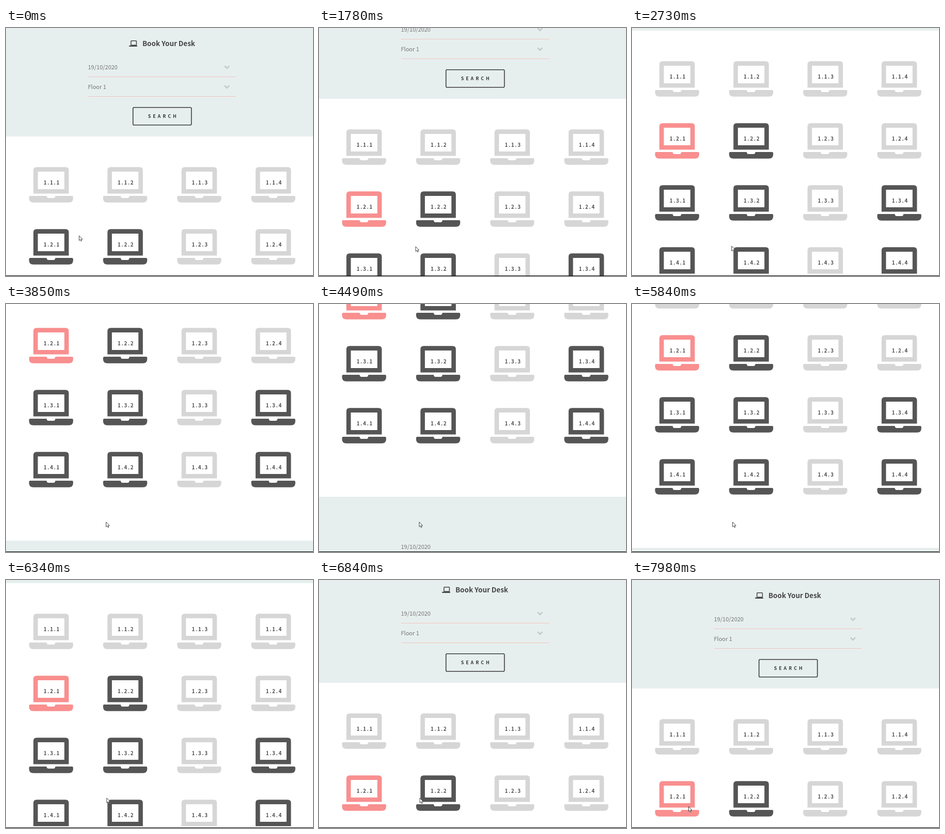
Animation of 594 by 480 pixels, one loop 8000 ms. Source, as an HTML page:

```html
<!DOCTYPE html>
<html lang="en">
<head>
<meta charset="utf-8">
<title>Desk booking</title>
<style>
  html, body { margin: 0; width: 100%; height: 100%; overflow: hidden; background: #fff; }
  svg { display: block; font-family: "Noto Sans CJK JP", "Noto Sans CJK SC", "Noto Sans CJK", "Open Sans", sans-serif; }
  .band { fill: #e7efee; }
  .title { font-size: 13.4px; font-weight: 700; fill: #444; }
  .field { font-size: 11px; font-weight: 300; fill: #757575; }
  .chevron { fill: none; stroke: #c8c8c8; stroke-width: 2.6; }
  .button rect { fill: none; stroke: #3c3c3c; stroke-width: 1.6; }
  .button text { font-size: 8.8px; font-weight: 900; letter-spacing: 4px; fill: #333; }
  .button.hover rect { stroke: #f98f8f; }
  .button.hover text { fill: #f98f8f; }
  .label { font-size: 9.8px; font-weight: 700; letter-spacing: 1.7px; fill: #4c4c4c; }
</style>
</head>
<body>
<svg id="stage" width="594" height="480" viewBox="0 0 594 480">
  <g id="page"></g>
  <rect y="479" width="594" height="1"/>
  <path id="cursor" d="M0 0V9.3L2.2 7.4 3.7 10.7 5.2 10 3.8 6.9H6.6Z" fill="#fff" stroke="#333" stroke-width=".9"/>
</svg>
<script>
const LOOP = 8000, FOOTER = 801;
const GREY = '#d6d6d6', DARK = [85, 85, 85], PINK = [249, 143, 143];
const LAPTOP = 'M8.5 51.3V6.4Q8.5 0 14.9 0H70.6Q77 0 77 6.4V51.3ZM17.1 8.6V42.8H68.4V8.6Z' +
  'M2 55.6H34q.5 4.2 4.5 4.2h8q4 0 4.5-4.2H83.5q2 0 2 4 0 8.8-8.5 8.8H8.5Q0 68.4 0 59.6 0 55.6 2 55.6Z';

// Each wheel notch eases the page by one step, within the scroll range.
const STEP = 68.2, NOTCH_MS = 190, MAX_SCROLL = 532;
const DOWN = [1555, 1750, 2185, 3205, 3435, 3832, 4425, 4490];
const UP = [5185, 5410, 5670, 5870, 6230, 6290, 6340, 6705];

// Pointer stops: [time, x, y]
const POINTER = [
  [10, 141.5, 402], [760, 94, 432], [1100, 115, 446], [1345, 115, 446], [1760, 187, 423],
  [2990, 193.5, 422], [7115, 195, 422], [7480, 300, 84.5], [7920, 110, 423.5], [7980, 109.5, 438.5]
];

const clamp = (v, lo = 0, hi = 1) => Math.max(lo, Math.min(hi, v));
const smooth = u => u * u * (3 - 2 * u);
const mix = (a, b, u) => a.map((v, i) => v + (b[i] - v) * u);

function scrollAt(t) {
  let target = 0, offset = 0;
  const turn = (start, step) => {
    const next = clamp(target + step, 0, MAX_SCROLL);
    offset += (next - target) * smooth(clamp((t - start) / NOTCH_MS));
    target = next;
  };
  DOWN.forEach(start => turn(start, STEP));
  UP.forEach(start => turn(start, -STEP));
  return Math.round(offset);
}

function pointerAt(t) {
  const next = POINTER.findIndex(k => k[0] > t);
  if (next < 1) return POINTER.at(next).slice(1);
  const a = POINTER[next - 1], b = POINTER[next];
  return mix(a, b, smooth((t - a[0]) / (b[0] - a[0]))).slice(1);
}

const field = (y, text, line) =>
  `<text class="field" x="158.5" y="${y}">${text}</text>
   <rect x="159" y="${y + 14}" width="286" height="1" fill="${line}"/>`;
const chevron = y => `<path class="chevron" d="M422.9 ${y}l4.6 4.6 4.6-4.6"/>`;
const button = (id, x, text) =>
  `<g class="button" id="${id}"><rect x="245.7" y="153.7" width="113" height="34" rx="2"/>
   <text x="${x}" y="174">${text}</text></g>`;

function desk(row, col) {
  const name = `1.${row + 1}.${col + 1}`;
  const dark = row > 0 && col < 2 || row > 1 && col === 3;
  return `<g transform="translate(${44.5 + col * 143.3} ${269.3 + row * 120})">
    <path id="desk${name}" d="${LAPTOP}" fill-rule="evenodd" fill="${dark ? `rgb(${DARK})` : GREY}"/>
    <text class="label" x="28.3" y="33.8">${name}</text></g>`;
}

const header = `<rect class="band" width="594" height="210"/>
  <rect x="241.8" y="24.7" width="10.6" height="8.5" rx="1" fill="none" stroke="#444" stroke-width="1.5"/>
  <rect x="238" y="33.8" width="16" height="2.2" rx="1" fill="#444"/>
  <text class="title" x="264" y="34.5">Book Your Desk</text>` +
  field(80, '19/10/2020', '#f0c5c1') + chevron(73.3) +
  field(118, 'Floor 1', '#f0c5c1') + chevron(111.3) +
  button('search', 274.7, 'SEARCH');
const footer = `<rect class="band" y="${FOOTER}" width="594" height="220"/>
  <g transform="translate(0 ${FOOTER + 21})">` +
  field(80, '19/10/2020', '#c9cfce') + field(118, 'desk121', '#c9cfce') +
  button('book', 283.5, 'BOOK') + '</g>';

let desks = '';
for (let row = 0; row < 4; row++)
  for (let col = 0; col < 4; col++) desks += desk(row, col);

const $ = id => document.getElementById(id);
$('page').innerHTML = header + desks + footer;
const page = $('page'), cursor = $('cursor'), search = $('search'), picked = $('desk1.2.1');

function draw(t) {
  const scroll = scrollAt(t);
  const [x, y] = pointerAt(t);
  page.setAttribute('transform', `translate(0 ${-scroll})`);
  cursor.setAttribute('transform', `translate(${x} ${y})`);
  const pageY = y + scroll;
  search.classList.toggle('hover', x > 245 && x < 359 && pageY > 153 && pageY < 188);
  const rgb = mix(DARK, PINK, clamp((t - 560) / 200));
  picked.setAttribute('fill', `rgb(${rgb.map(Math.round)})`);
}

const start = performance.now();
function tick() {
  draw((performance.now() - start) % LOOP);
  requestAnimationFrame(tick);
}
tick();
</script>
</body>
</html>
```
